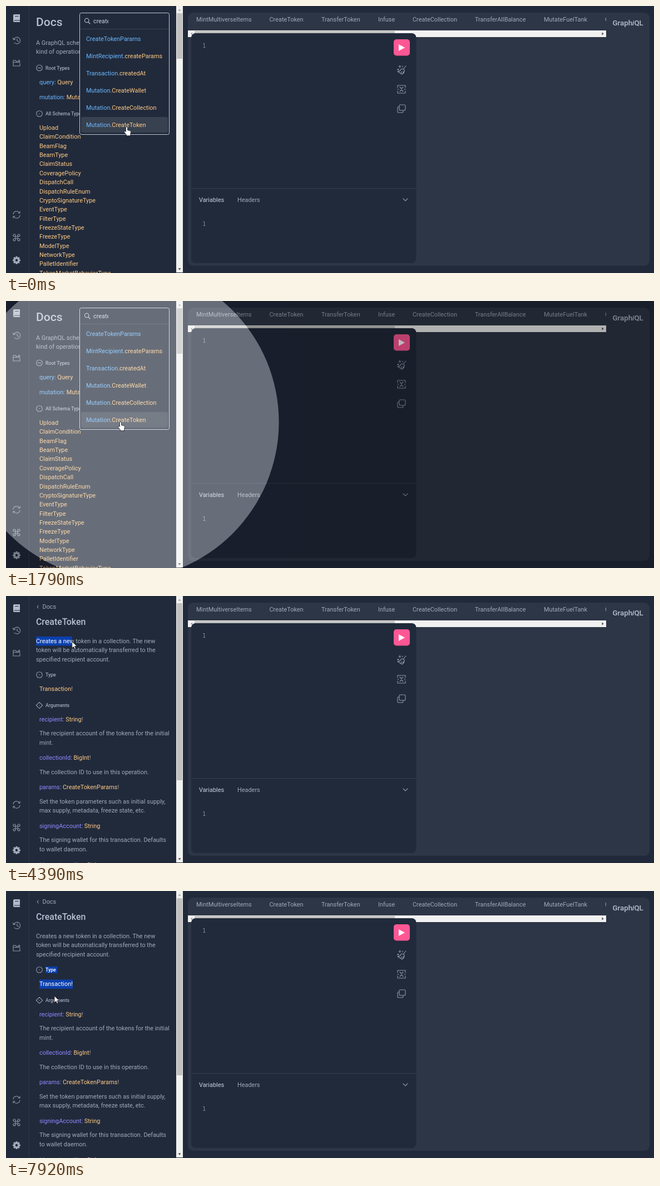
Animation of 1165x481 px, one loop 7990 ms. Source, as an HTML page:

```html
<!DOCTYPE html>
<html lang="en">
<head>
<meta charset="utf-8">
<title>Schema docs explorer</title>
<style>
html, body { margin: 0; width: 100%; height: 100%; overflow: hidden; background: #212a3b; }
svg { display: block; width: 100%; height: 100%; font: 10.9px Roboto, sans-serif; fill: #a1aaba; }
text { white-space: pre; }
.line { fill: none; stroke: #8d97a8; stroke-width: 1.1; stroke-linecap: round; stroke-linejoin: round; }
.title { font-weight: 500; fill: #b5bfd0; }
.section { font-size: 8.72px; font-weight: 500; }
.type { fill: #ffca85; }
.field { fill: #6bb8ff; }
.arg { fill: #8f8aff; }
.bright { fill: #c9d1df; }
.num { font: 10.5px "DejaVu Sans Mono", monospace; fill: #7d8798; }
.lit * { fill: #fff; }
.pointer path { fill: #fff; stroke: #10141c; stroke-width: .8; stroke-linejoin: round; }
</style>
</head>
<body>
<svg id="stage" viewBox="0 0 1165 481" preserveAspectRatio="none"></svg>
<script>
const DURATION = 7990, STEP = DURATION / 120, PAGE_CHANGE = 2390;

// Text is placed by the middle of its line.
const text = (x, y, content, cls = '', size = 10.9) =>
  `<text x="${x}" y="${y + size * .36}" class="${cls}"${size !== 10.9 ? ` style="font-size:${size}px"` : ''}>${content}</text>`;
const span = (cls, content) => `<tspan class="${cls}">${content}</tspan>`;
const rect = (x, y, w, h, fill, r = 0, extra = '') =>
  `<rect x="${x}" y="${y}" width="${w}" height="${h}" rx="${r}" fill="${fill}" ${extra}/>`;
const icon = (x, y, d, extra = '') => `<path class="line" transform="translate(${x} ${y})" d="${d}" ${extra}/>`;
const solid = (x, y, d, fill) => `<path transform="translate(${x} ${y})" d="${d}" fill="${fill}"/>`;
const member = (owner, name) => span('field', owner) + span('bright', '.') + span('type', name);
const argument = (name, type, cls = 'arg') => span(cls, name) + ': ' + span('type', type);
const section = (y, label, mark) =>
  icon(60, y, mark) + text(71, y, label, 'section', 8.72);

const RING = 'M-5.3 0a5.3 5.3 0 1 0 10.6 0a5.3 5.3 0 1 0-10.6 0';
const DOT = 'M-.5 0h1';
const DIAMOND = 'M0-5.7L5.7 0L0 5.7L-5.7 0Z';

function sidebar() {
  const gear = [...Array(8)].map((_, i) =>
    `<rect x="-1.6" y="-7" width="3.2" height="4" rx=".6" transform="rotate(${i * 45})"/>`).join('');
  return rect(41, 0, 1, 481, '#303949') +
    solid(19, 22, 'M-4-7H6V7H-4Q-6 7-6 5V-5Q-6-7-4-7Z', '#b3bccb') +
    icon(19, 22, 'M-4 4H6M-2.5-3.5H3', 'style="stroke:#212a3b"') +
    icon(19, 62, 'M-5-2A6 6 0 1 1-4 4M-6.5-4.5L-5.3-1.2L-2-2.2M1-3V.5L3.5 2') +
    icon(19, 103, 'M-6 5V-5H-2L0-3H2M6 0V5H-6V-1.5H6M4.5-6V-2M2.5-4H6.5') +
    icon(19, 376, 'M-6-1A6 6 0 0 1 5-3.5M6-6V-3H3M6 1A6 6 0 0 1-5 3.5M-6 6V3H-3') +
    icon(19, 417, 'M-2-2H2V2H-2ZM-2-2H-4A2 2 0 1 1-2-4ZM2-2V-4A2 2 0 1 1 4-2ZM2 2H4A2 2 0 1 1 2 4ZM-2 2V4A2 2 0 1 1-4 2Z') +
    `<g transform="translate(19 458)">${gear}<circle r="5.4"/><circle r="2.2" fill="#212a3b"/></g>`;
}

function workspace() {
  const tabs = [[342, 'MintMultiverseItems'], [473.5, 'CreateToken'], [567, 'TransferToken'], [669, 'Infuse'],
    [731, 'CreateCollection'], [843, 'TransferAllBalance'], [967, 'MutateFuelTank']];
  return rect(327, 12, 830, 456, '#2d3646', 9) +
    tabs.map(([x, name]) => text(x, 24, name)).join('') +
    `<g clip-path="url(#tabClip)">${text(1077, 24, 'CreateWallet')}</g>` +
    rect(327, 44, 752, 12, '#f1f1f1') + rect(339, 45, 360, 10, '#c1c1c1') +
    solid(333, 50, 'M2-2.5L-1 0L2 2.5Z', '#a0a0a0') + solid(1073, 50, 'M-1.5-2.5L1.5 0L-1.5 2.5Z', '#404040') +
    text(1090.5, 30, 'Graph<tspan font-style="italic">i</tspan>QL', 'title', 13.3) +
    rect(333, 49, 404.5, 414, '#212a3b', 8) + rect(333, 328, 404.5, 1.2, '#333c4c') +
    text(353, 71.5, '1', 'num', 10.5) + text(353, 392, '1', 'num', 10.5) +
    text(347, 349, 'Variables', 'bright') + text(416, 349, 'Headers') +
    icon(718, 349, 'M-4-2L0 2L4-2') +
    rect(697, 60, 29, 29.5, '#ff5794', 5) + solid(711, 75, 'M-5-6L6 0L-5 6Z', '#fff') +
    icon(711, 115, 'M8-7L3-1M-1-1Q2-3 5 0Q6 5 1 8L-7 3Q-2 3-1-1M1 3L-1 6M4 3L2 7M-3-8V-4M-5-6H-1M-6-2V1M-7.5-.5H-4.5M2-7V-5') +
    icon(711, 150, 'M-7-3V-7H7V-3M-7 3V7H7V3M-3-4L0-1L3-4M-3 4L0 1L3 4M-7 0H-5M5 0H7') +
    icon(711, 185, 'M-2-7H5Q7-7 7-5V1Q7 3 5 3H-2Q-4 3-4 1V-5Q-4-7-2-7ZM-4-3H-6Q-7-3-7-2V5Q-7 7-5 7H1Q3 7 3 5V3');
}

function scrollbar(thumbEnd) {
  return rect(306, 0, 12, 480, '#f1f1f1') + rect(307, 13, 10, thumbEnd - 13, '#c1c1c1') +
    solid(312, 7, 'M-2.5 1.5L0-1.5L2.5 1.5Z', '#a0a0a0') + solid(312, 474, 'M-2.5-1.5L0 1.5L2.5-1.5Z', '#404040');
}

function homePage() {
  const types = ['Upload', 'ClaimCondition', 'BeamFlag', 'BeamType', 'ClaimStatus', 'CoveragePolicy', 'DispatchCall',
    'DispatchRuleEnum', 'CryptoSignatureType', 'EventType', 'FilterType', 'FreezeStateType', 'FreezeType', 'ModelType',
    'NetworkType', 'PalletIdentifier', 'TokenMarketBehaviorType'];
  const results = [span('field', 'CreateTokenParams'), member('MintRecipient', 'createParams'),
    member('Transaction', 'createdAt'), member('Mutation', 'CreateWallet'),
    member('Mutation', 'CreateCollection'), member('Mutation', 'CreateToken')];
  return text(54, 28, 'Docs', 'title', 21) +
    text(54, 66, 'A GraphQL schema provides a root type for') + text(54, 82, 'kind of operation.') +
    section(111.5, 'Root Types', RING + 'M-2.5 .5Q-1.2-1.5 0 0T2.5-.5') +
    text(60, 137, argument('query', 'Query', 'field')) + text(60, 164.5, argument('mutation', 'Mutation', 'field')) +
    section(194, 'All Schema Types', RING + DOT) +
    types.map((name, i) => text(60, 219 + i * 16.37, name, 'type')).join('') +
    rect(132.5, 12.5, 161, 219, '#212a3b', 3, 'stroke="#c0c8d5"') + rect(133, 41, 160, 1, '#3b4454') +
    icon(146, 27, 'M-4.5-1a3.7 3.7 0 1 0 7.4 0a3.7 3.7 0 1 0-7.4 0M2 2L5 5', 'style="stroke:#c0c8d5"') +
    `<g clip-path="url(#queryClip)">${text(157, 27, 'create', 'bright')}</g>` +
    rect(135, 200, 156, 28, '#38414f', 3) +
    results.map((label, i) => text(144, 59 + i * 31.05, label)).join('') + scrollbar(95);
}

const description = ['Creates a new token in a collection. The new', 'token will be automatically transferred to the',
  'specified recipient account.'].map((line, i) => text(54, 81 + i * 16.3, line)).join('');
const typeName = 'Type', returnType = span('type', 'Transaction') + '!';
const selectable = description + text(71, 142, typeName, 'section', 8.72) + text(60, 167.5, returnType);

function fieldPage() {
  return icon(57, 19.5, 'M1.2-2.4L-1 0L1.2 2.4') + text(65.5, 19.5, 'Docs') +
    text(54, 46.5, 'CreateToken', 'title', 15.9) +
    icon(60, 142, RING + DOT) + selectable + section(197, 'Arguments', DIAMOND + DOT) +
    text(60, 222.5, argument('recipient', 'String') + '!') +
    text(60, 247, 'The recipient account of the tokens for the initial') + text(60, 264, 'mint.') +
    text(60, 291.5, argument('collectionId', 'BigInt') + '!') +
    text(60, 317, 'The collection ID to use in this operation.') +
    text(60, 344.5, argument('params', 'CreateTokenParams') + '!') +
    text(60, 370, 'Set the token parameters such as initial supply,') + text(60, 386, 'max supply, metadata, freeze state, etc.') +
    text(60, 414.5, argument('signingAccount', 'String')) +
    text(60, 439.5, 'The signing wallet for this transaction. Defaults') + text(60, 456, 'to wallet daemon.') +
    text(60, 484.5, argument('idempotencyKey', 'String')) + scrollbar(332);
}

stage.innerHTML = `<defs>
  <clipPath id="tabClip"><rect x="1070" y="12" width="9" height="30"/></clipPath>
  <clipPath id="queryClip"><rect x="150" y="15" width="34" height="25"/></clipPath>
  <clipPath id="selectionClip"><path id="selectionShape"/></clipPath></defs>
  ${rect(0, 0, 1165, 481, '#212a3b')}${sidebar()}${workspace()}
  <g id="home">${homePage()}</g>
  <g id="field">${fieldPage()}<g class="lit" clip-path="url(#selectionClip)">
    <rect x="50" y="70" width="230" height="110" style="fill:#0b40ad"/>${selectable}</g></g>
  <g id="spotlight"><path id="shade" fill="#000" fill-opacity=".84" fill-rule="evenodd"/><circle id="beam" fill="#fff"/></g>
  <g id="pointer" class="pointer">
    <path id="hand" d="M-1.6 8.5V1.2Q-1.5-.4 0-.4T1.6 1.2V5.6L6 6.6Q7.9 7.2 7.5 9.4L6.6 13.4V15.8H-.6V14L-4.6 9.2Q-4.8 7.2-2.8 7.5Z"/>
    <path id="arrow" d="M0 0V12L2.8 9.4L4.8 13.8L6.7 12.9L4.8 8.6H8.6Z"/></g>`;

const el = id => document.getElementById(id);
const [home, field, spotlight, shade, beam, pointer, hand, arrow, selectionShape] =
  ['home', 'field', 'spotlight', 'shade', 'beam', 'pointer', 'hand', 'arrow', 'selectionShape'].map(el);

// Pointer path: time, x, y.
const path = [[0, 217, 218], [800, 217, 218], [1000, 221.5, 215], [1330, 186, 206], [1660, 206, 218], [2389, 206, 218],
  [2390, 183, 141], [3260, 183, 141], [3320, 177, 141], [3700, 110, 100], [4050, 54, 74], [4120, 56, 77],
  [4400, 120, 82], [4860, 163, 103], [5200, 196, 115], [5800, 196, 115], [6130, 140, 140], [6600, 50, 92],
  [6800, 64, 136], [7000, 145, 180], [7130, 153, 167], [7600, 153, 167], [7920, 87, 189], [8000, 87, 189]];

function pointerAt(t) {
  const i = path.findIndex(key => key[0] > t);
  const [t0, x0, y0] = path[i - 1], [t1, x1, y1] = path[i];
  const k = (t - t0) / (t1 - t0);
  return [x0 + (x1 - x0) * k, y0 + (y1 - y0) * k];
}

// Rows are [left, top, right, bottom]; rows before the active one are filled.
const paragraphRows = [[54, 73, 271, 89.4], [54, 89.4, 270, 105.7], [54, 105.7, 188, 121]];
const typeRows = [[71, 136, 92, 148], [60, 159.5, 120, 176]];

function selectRows(rows, active, x) {
  return rows.slice(0, active + 1).map(([left, top, right, bottom], i) => {
    const end = i < active ? right : Math.max(left, Math.min(right, x));
    return `M${left} ${top}H${end}V${bottom}H${left}Z`;
  }).join('');
}

function selection(t) {
  if (t >= 4110 && t < 6130) {
    const [x, y] = pointerAt(Math.min(t, 5200));
    return selectRows(paragraphRows, Math.max(0, Math.min(2, Math.floor((y - 73) / 15))), x);
  }
  if (t >= 6800) {
    const [x, y] = pointerAt(Math.min(t, 7130));
    return selectRows(typeRows, y < 155 ? 0 : 1, x);
  }
  return '';
}

const easeOut = u => 1 - (1 - Math.max(0, Math.min(1, u))) ** 3;

function render(now) {
  const t = Math.floor((now % DURATION) / STEP + .2) * STEP % DURATION;
  const [x, y] = pointerAt(t), onHome = t < PAGE_CHANGE;
  const strength = t < 199 ? 0 : easeOut((t - 47) / 500) - easeOut((t - 1728) / 500);
  const r = 73 + 583 * (1 - strength);

  home.style.display = hand.style.display = onHome ? '' : 'none';
  field.style.display = arrow.style.display = onHome ? 'none' : '';
  selectionShape.setAttribute('d', selection(t));
  pointer.setAttribute('transform', `translate(${x} ${y})`);

  spotlight.style.display = strength > .01 ? '' : 'none';
  spotlight.setAttribute('opacity', strength * .5);
  shade.setAttribute('d', `M0 0H1165V481H0ZM${x - r} ${y}a${r} ${r} 0 1 0 ${2 * r} 0a${r} ${r} 0 1 0 ${-2 * r} 0Z`);
  beam.setAttribute('cx', x);
  beam.setAttribute('cy', y);
  beam.setAttribute('r', r);
}

const start = performance.now();
function loop() {
  render(performance.now() - start);
  requestAnimationFrame(loop);
}
loop();
</script>
</body>
</html>
```
